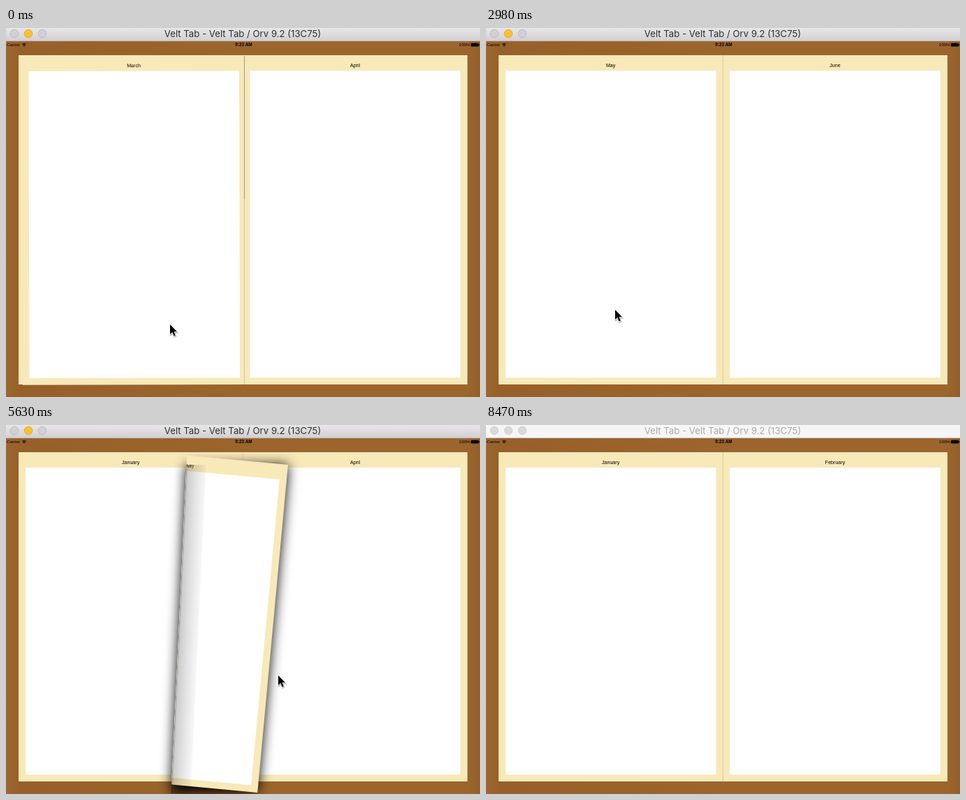
Write an HTML page that moves like this. It is 679x529 px and loops after 8.51 s.

```html
<!DOCTYPE html>
<html lang="en">
<head>
<meta charset="utf-8">
<title>Page curl</title>
<style>
html, body { margin: 0; width: 100%; height: 100%; overflow: hidden; background: #99632b; }
svg { display: block; width: 100vw; height: 100vh; }
text { font-family: "Liberation Sans", Arial, sans-serif; }
.mid { text-anchor: middle; }
#caption { font: 13.2px Inter, sans-serif; }
</style>
</head>
<body>
<svg viewBox="0 0 679 529">
  <defs>
    <linearGradient id="wood">
      <stop offset="0" stop-color="#9c672f"/><stop offset=".03" stop-color="#97602a"/>
      <stop offset=".5" stop-color="#9b652d"/><stop offset=".975" stop-color="#9b652d"/>
      <stop offset="1" stop-color="#945e28"/>
    </linearGradient>
    <linearGradient id="chrome" x2="0" y2="1">
      <stop offset="0" stop-color="#e8e6e8"/><stop offset="1" stop-color="#d1cfd1"/>
    </linearGradient>
    <linearGradient id="roll">
      <stop offset="0" stop-opacity=".42"/><stop offset=".08" stop-opacity=".2"/>
      <stop offset=".45" stop-opacity=".12"/><stop offset=".75" stop-opacity=".07"/>
      <stop offset="1" stop-opacity=".03"/>
    </linearGradient>
    <filter id="soft" filterUnits="userSpaceOnUse" x="-60" y="-60" width="800" height="660">
      <feGaussianBlur stdDeviation="9"/>
    </filter>
  </defs>
  <rect width="679" height="529" fill="url(#wood)"/>
  <g font-size="6.2">
    <text x="1" y="26.3">Carrier</text>
    <g fill="none" stroke="#000" stroke-width="1">
      <path d="M23.3 23.4Q26 20.9 28.7 23.4M24.4 24.7Q26 23.3 27.6 24.7"/>
    </g>
    <circle cx="26" cy="25.7" r=".8"/>
    <text class="mid" x="340.5" y="26.3" font-size="6.4" font-weight="bold">9:23 AM</text>
    <text x="649" y="26.3">100%</text>
    <rect x="666" y="21.8" width="11" height="4.6" rx=".8"/>
    <rect x="677.3" y="23" width="1" height="2.2"/>
  </g>
  <g id="book"></g>
  <rect id="bar" width="679" height="19"/>
  <path d="M0 18.6H679" stroke="#b9b3ae" stroke-width=".8"/>
  <g id="lights" stroke-width=".8">
    <circle cx="12" cy="8" r="5.8"/><circle cx="32" cy="8" r="5.8"/><circle cx="52" cy="8" r="5.8"/>
  </g>
  <text id="caption" class="mid" x="339" y="13">Velt Tab - Velt Tab / Orv 9.2 (13C75)</text>
  <g id="cursor">
    <path d="M0 0V14L3.2 11 5.5 16.4 7.9 15.4 5.6 10.2H10Z" fill="#000" opacity=".3" transform="translate(.5 1.5)" stroke="#000" stroke-width="1.5"/>
    <path d="M0 0V14L3.2 11 5.5 16.4 7.9 15.4 5.6 10.2H10Z" stroke="#fff" stroke-width="1.6" paint-order="stroke"/>
  </g>
</svg>
<script>
const LOOP = 8510, TOP = 39, HEIGHT = 472, BLUR_AT = 8470;
const SPREADS = [["January", "February"], ["March", "April"], ["May", "June"]];
const $ = id => document.getElementById(id);

// Poses: cursor x, cursor y, then free edge x and fold tilt while a page turns.
const ACTS = [
  { a: 0, b: 150, at: 1, poses: [[235, 425]], settle: 1 },
  { a: 150, b: 590, at: 1, settle: .75, poses: [[239, 423], [244, 421], [250, 418], [255, 416]] },
  { a: 1040, b: 1340, at: 1, poses: [[370, 390], [520, 350], [617, 327]] },
  { a: 1780, b: 2530, at: 1, to: 2, poses: [[600, 328, 625, -.4], [540, 330, 575, -.6],
    [450, 334, 520, -.7], [353, 341, 455, -.85], [230, 390, 88, -.6], [216, 396]] },
  { a: 2980, b: 3130, at: 2, poses: [[185, 404], [152, 412]] },
  { a: 3430, b: 4010, at: 2, to: 1, poses: [[180, 409, 60, -2], [270, 392, 150, -3.5],
    [408, 373, 275, -4], [438, 374, 450, -2], [440, 374]] },
  { a: 4610, b: 4900, at: 1, poses: [[377, 374], [230, 358], [127, 342]] },
  { a: 5190, b: 6230, at: 1, to: 0, poses: [[160, 343, 90, 1], [240, 348, 200, 1.8],
    [320, 354, 310, 2.4], [390, 359, 404, 2.66], [440, 368, 470, 2.2], [490, 377, 520, 1.6],
    [525, 385, 556, .9], [536, 388]] },
  { a: 6530, b: 7110, at: 0, poses: [[555, 415], [580, 450], [605, 480], [630, 512], [640, 560]] }
];

const rect = (x, y, w, h, fill) =>
  `<rect x="${x}" y="${y}" width="${w}" height="${h}" fill="${fill}"/>`;

const label = (name, x, squeeze = 1) =>
  `<text class="mid" font-size="7.1" transform="translate(${x} 55.8) scale(${squeeze} 1)">${name}</text>`;

function sheet(side, name) {
  const x = side ? 339.5 : 18;
  return rect(x, TOP, 321.5, HEIGHT, "#f8e9b9") +
    rect(side ? 349.3 : 28, 61.2, 301.6, 440, "#fff") +
    (name ? label(name, side ? 500 : 178.6) : "");
}

const spread = ([left, right]) => sheet(0, left) + sheet(1, right);

function curl(from, to, dir, edge, tilt) {
  const side = dir > 0 ? 1 : 0;
  const home = side ? 18 : 661, far = 679 - home;
  const travel = Math.abs(edge - home);
  const width = (travel - Math.min(side ? 95 : 73, .8 * travel)) / 2;
  const fold = edge - dir * width;
  const rad = tilt * Math.PI / 180;
  const top = TOP + (edge - home) * Math.tan(rad);
  const foot = (x, angle) => [x - HEIGHT * Math.sin(angle), top + HEIGHT * Math.cos(angle)];
  const outline = [[edge, top], foot(edge, 2 * rad), foot(fold, rad), [fold, top]].join(" ");
  const frame = `translate(${fold} ${top}) rotate(${tilt})`;
  const base = side ? [to[0], from[1]] : [from[0], to[1]];
  const name = width > 135
    ? label(to[side], far - dir * Math.min(161, width - 2), width < 180 ? .65 : 1) : "";
  return `<clipPath id="cut"><rect x="${side ? 0 : -700}" y="-80" width="700" height="680" transform="${frame}"/></clipPath>` +
    spread(base) +
    `<g clip-path="url(#cut)">${sheet(1 - side, from[1 - side])}</g>` +
    `<polygon points="${outline}" filter="url(#soft)"/>` +
    `<g clip-path="url(#cut)"><g transform="translate(${edge} ${top}) rotate(${2 * tilt}) translate(${-far} ${-TOP})">` +
    sheet(side) + name + `</g></g>` +
    `<clipPath id="leaf"><polygon points="${outline}"/></clipPath>` +
    `<g clip-path="url(#leaf)"><rect y="-40" width="28" height="580" fill="url(#roll)" transform="${frame} scale(${dir} 1)"/></g>`;
}

function landing(names, rest) {
  const line = (y1, y2, alpha) =>
    `<path d="M341.5 ${y1}V${y2}" stroke="#77705c" stroke-width="1" opacity="${alpha * rest}"/>`;
  return spread(names) +
    `<g transform="translate(${4.4 * rest} ${.8 * rest}) rotate(${-.13 * rest} 18 39)">${sheet(0, names[0])}</g>` +
    rect(339.5, TOP, 9.8, HEIGHT, "#f8e9b9") + line(40, 245, .65) + line(245, 511, .3);
}

function picture(act, step) {
  const [, , edge, tilt] = act.poses[step];
  const from = SPREADS[act.at];
  if (act.settle) {
    const rest = act.settle - step / 4;
    return rest > 0 ? landing(from, rest) : spread(from);
  }
  if (act.to === undefined) return spread(from);
  const to = SPREADS[act.to];
  return edge === undefined ? spread(to) : curl(from, to, act.at - act.to, edge, tilt);
}

function setFocus(on) {
  $("bar").setAttribute("fill", on ? "url(#chrome)" : "#f6f6f6");
  $("caption").setAttribute("fill", on ? "#303030" : "#a9a9a9");
  [...$("lights").children].forEach((dot, i) => {
    const amber = on && i === 1;
    dot.setAttribute("fill", amber ? "#fcc02e" : on ? "#d2d0d2" : "#d9d9d9");
    dot.setAttribute("stroke", amber ? "#dfa023" : on ? "#b8b6b8" : "#cfcfcf");
  });
}

let shown = "";
function render(t) {
  const act = ACTS.findLast(item => item.a <= t);
  const last = act.poses.length - 1;
  const step = Math.min(last, Math.floor((t - act.a) / (act.b - act.a) * last + .05));
  const focus = t < BLUR_AT;
  const key = [act.a, step, focus].join();
  if (key === shown) return;
  shown = key;
  const [x, y] = act.poses[step];
  $("book").innerHTML = picture(act, step);
  $("cursor").setAttribute("transform", `translate(${x} ${y})`);
  setFocus(focus);
}

const start = performance.now();
function tick() {
  render((performance.now() - start) % LOOP);
  requestAnimationFrame(tick);
}
tick();
</script>
</body>
</html>
```
